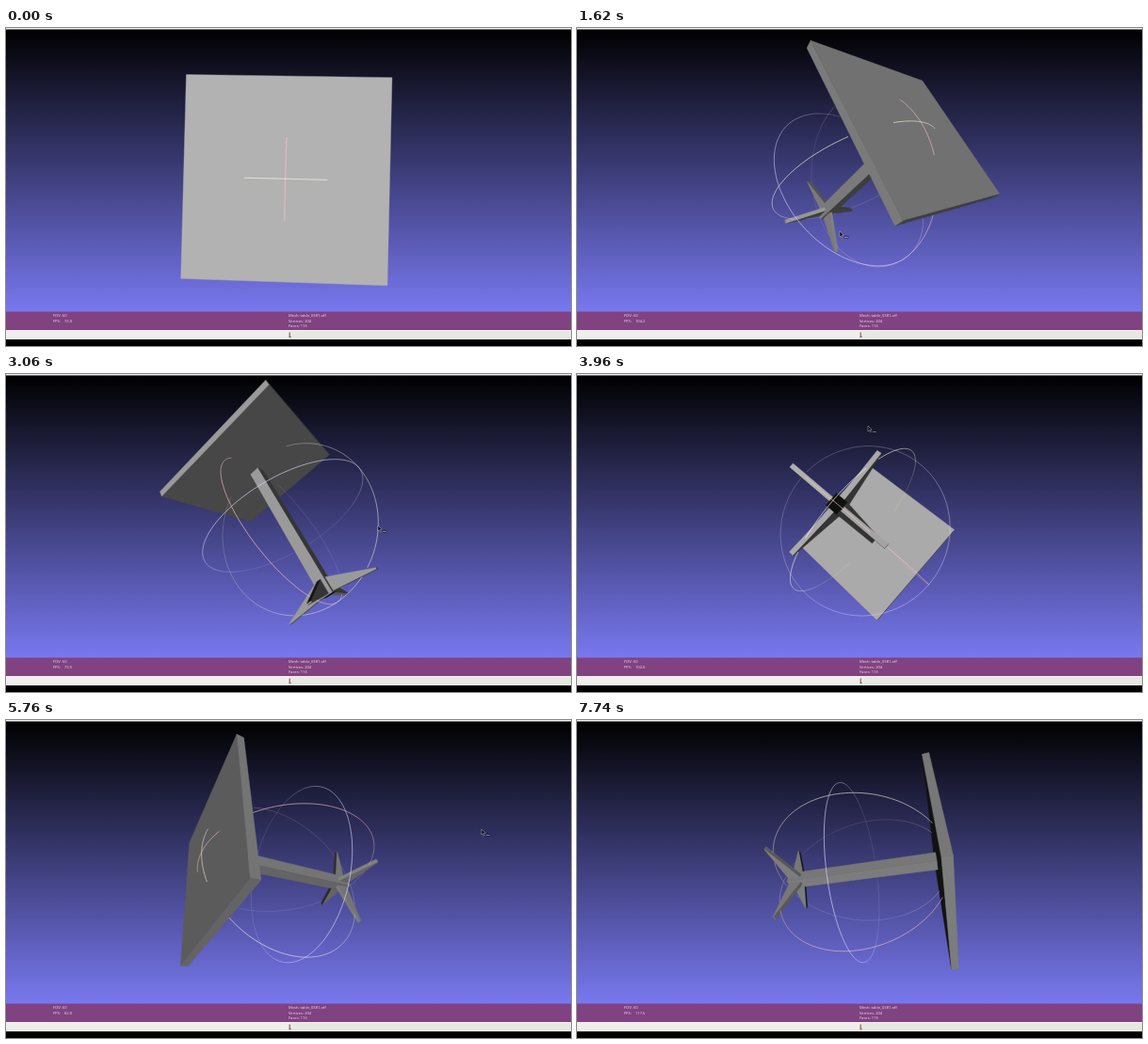
Animation, 600 px wide and 338 px high, one loop 7.86 s. Source, as an HTML page with a canvas:

```html
<!DOCTYPE html>
<html lang="en">
<head>
<meta charset="utf-8">
<title>Table mesh viewer</title>
<style>
  html, body { margin: 0; width: 600px; height: 338px; overflow: hidden; background: #000; }
  svg, canvas { position: absolute; left: 0; top: 0; display: block; }
  text { font: 4.1px "Open Sans", "Noto Sans", sans-serif; fill: #efe4ef; }
</style>
</head>
<body>
<svg width="600" height="338" viewBox="0 0 600 338">
  <defs>
    <linearGradient id="sky" x1="0" y1="0" x2="0" y2="1">
      <stop offset="0" stop-color="#000"/>
      <stop offset="1" stop-color="#8080ff"/>
    </linearGradient>
  </defs>
  <rect width="600" height="338"/>
  <rect y="1" width="600" height="320" fill="url(#sky)"/>
  <rect width="600" height="1.5" fill="#eee"/>
  <rect y="301.5" width="600" height="19.5" fill="#804280"/>
  <rect y="321" width="600" height="10" fill="#f0eeec"/>
  <rect x="302" y="322" width="298" height="8" fill="#e8e8e3"/>
  <path d="M301.2 323.5v5M300.6 328.3h2" stroke="#6b4a3a" fill="none"/>
  <text x="50" y="307.4">FOV: 60</text>
  <text x="50" y="312.8">FPS:</text>
  <text id="rate" x="62" y="312.8">73.0</text>
  <text x="300" y="307.4">Mesh: table_0381.off</text>
  <text x="300" y="312.8">Vertices: 204</text>
  <text x="300" y="318.4">Faces: 116</text>
</svg>
<canvas id="view" width="600" height="338"></canvas>
<script>
(() => {
const LOOP = 7860, STEP = 60;
const EYE = 3.03, FOCAL = 277, CX = 300, CY = 161;
const ctx = document.getElementById('view').getContext('2d');
const rateText = document.getElementById('rate');

const dot = (a, b) => a[0] * b[0] + a[1] * b[1] + a[2] * b[2];
const cross = (a, b) => [a[1] * b[2] - a[2] * b[1], a[2] * b[0] - a[0] * b[2], a[0] * b[1] - a[1] * b[0]];
const times = (a, k) => a.map(v => v * k);
const add = (...vs) => vs.reduce((s, v) => s.map((c, i) => c + v[i]));
const sub = (a, b) => a.map((v, i) => v - b[i]);
const unit = a => times(a, 1 / Math.hypot(...a));
const clamp = (v, lo, hi) => Math.min(hi, Math.max(lo, v));

// Convex solid between two matching outlines
function prism(a, b, openBase) {
  const mid = times(add(...a, ...b), .5 / a.length);
  const sides = a.map((p, i) => {
    const j = (i + 1) % a.length;
    return [p, a[j], b[j], b[i]];
  });
  return [a, b, ...sides].map((pts, i) => {
    let n = unit(cross(sub(pts[1], pts[0]), sub(pts[2], pts[0])));
    if (dot(n, sub(pts[0], mid)) < 0) n = times(n, -1);
    return { pts, n, d: dot(n, pts[0]), dark: openBase && i === 0 };
  });
}
const square = (r, h) => [[-r, -r, h], [r, -r, h], [r, r, h], [-r, r, h]];

const SLAB = .867, POST = .066;
const slab = prism(square(.8265, SLAB), square(.8265, .94));
const post = prism(square(POST, -.9), square(POST, SLAB), true);
const legs = [[1, 0], [0, 1], [-1, 0], [0, -1]].map(([c, s]) => {
  const outline = w => [[.55, -.94], [.55, -.925], [POST, -.73], [POST, -.89]]
    .map(([r, h]) => [r * c - w * s, r * s + w * c, h]);
  return { dir: [c, s, 0], solid: prism(outline(-.022), outline(.022)) };
});
const solids = [slab, post, ...legs.map(l => l.solid)];

// Key poses: angles in degrees, pointer place, frame rate
const poses = [
  { yaw: -1.4, pitch: .3, spin: -1.4, at: [222, 268], rate: '73.0' },
  { yaw: 41.4, pitch: 32, spin: 4, at: [279, 216], rate: '104.2' },
  { yaw: 90, pitch: 60.6, spin: -90, at: [388, 163], rate: '87.7' },
  { yaw: -130.6, pitch: 52.1, spin: 105, at: [395, 161], rate: '73.5' },
  { yaw: 167.6, pitch: -11.5, spin: 129.4, at: [309, 55], rate: '102.0' },
  { yaw: -58.7, pitch: 10.8, spin: 124.2, at: [505, 116], rate: '82.0' },
  { yaw: 74.8, pitch: 7.5, spin: 136, at: [505, 116], rate: '117.6' }
];
// Drags: start, end, share of the way to the next pose
const drags = [[840, 1620, 1], [1620, 2220, 1], [2220, 3060, 1], [3060, 3960, 1], [3960, 5760, 1],
  [5880, 6000, .13], [6300, 6480, .29], [6600, 7440, .58]];

const progress = t => drags.reduce((p, [a, b, share]) => p + share * clamp((t - a) / (b - a), 0, 1), 0);

// Model axes on screen: two table edges and the table normal
function axes({ yaw, pitch, spin }) {
  const [y, p, s] = [yaw, pitch, spin].map(a => a * Math.PI / 180);
  const up = [Math.sin(y) * Math.cos(p), Math.sin(p), Math.cos(y) * Math.cos(p)];
  const side = [Math.cos(y), 0, -Math.sin(y)];
  const edge = turn(side, up, s);
  return [edge, cross(up, edge), up];
}

function turn(v, axis, angle) {
  const c = Math.cos(angle), s = Math.sin(angle);
  return add(times(v, c), times(cross(axis, v), s), times(axis, dot(axis, v) * (1 - c)));
}

// Shortest turn from one pose to the next
function basisAt(i, f) {
  const a = axes(poses[i]), b = axes(poses[i + 1]);
  const axis = unit(add(...a.map((v, k) => cross(v, b[k]))));
  const trace = a.reduce((s, v, k) => s + dot(v, b[k]), 0);
  const angle = Math.acos(clamp((trace - 1) / 2, -1, 1));
  return a.map(v => turn(v, axis, angle * f));
}

function project(p, basis) {
  const [x, y, z] = add(...basis.map((e, k) => times(e, p[k])));
  const k = FOCAL / (EYE - z);
  return [CX + x * k, CY - y * k, z];
}

function trace(pts) {
  ctx.beginPath();
  pts.forEach(([x, y]) => ctx.lineTo(x, y));
}

function drawSolid(solid, basis, look, cam) {
  ctx.lineWidth = .4;
  for (const { pts, n, d, dark } of solid) {
    if (dot(n, cam) <= d) continue;
    const g = dark ? 16 : Math.round(Math.max(18, 178 * dot(n, look)));
    ctx.fillStyle = ctx.strokeStyle = `rgb(${g},${g},${g})`;
    trace(pts.map(p => project(p, basis)));
    ctx.closePath();
    ctx.fill();
    ctx.stroke();
  }
}

function hidden(p, cam) {
  const ray = sub(p, cam);
  return solids.some(solid => {
    let near = 0, far = .998;
    for (const { n, d } of solid) {
      const gap = d - dot(n, cam), speed = dot(n, ray);
      if (speed < 0) near = Math.max(near, gap / speed);
      else if (speed > 0) far = Math.min(far, gap / speed);
      else if (gap < 0) return false;
    }
    return near < far;
  });
}

// Trackball circles, one around each axis
function drawRings(basis, cam) {
  const N = 240;
  ctx.lineWidth = .8;
  ['255,196,200', '250,250,225', '222,218,255'].forEach((color, k) => {
    let prev = null;
    for (let i = 0; i <= N; i++) {
      const q = i / N * 2 * Math.PI, p = [0, 0, 0];
      p[(k + 1) % 3] = Math.cos(q);
      p[(k + 2) % 3] = Math.sin(q);
      const pt = hidden(p, cam) ? null : project(p, basis);
      if (pt && prev) {
        ctx.strokeStyle = `rgba(${color},${clamp(.42 + .45 * pt[2], .16, .85)})`;
        trace([prev, pt]);
        ctx.stroke();
      }
      prev = pt;
    }
  });
}

function drawPointer(x, y) {
  ctx.save();
  ctx.translate(x, y);
  trace([[0, 0], [0, 6], [1.4, 4.8], [2.6, 7], [3.4, 6.5], [2.4, 4.4], [4.2, 4.2]]);
  ctx.closePath();
  ctx.fillStyle = '#0a0a12';
  ctx.strokeStyle = 'rgba(225,225,235,.75)';
  ctx.lineWidth = .5;
  ctx.fill();
  ctx.stroke();
  ctx.beginPath();
  ctx.ellipse(6.8, 6.3, 2.6, 1.2, .1, 0, 2 * Math.PI);
  ctx.strokeStyle = 'rgba(20,20,30,.9)';
  ctx.lineWidth = .7;
  ctx.stroke();
  ctx.fillStyle = 'rgba(215,215,225,.6)';
  ctx.fillRect(4.8, 6, 4, .8);
  ctx.restore();
}

function draw(t) {
  const p = progress(t);
  const i = Math.min(Math.floor(p), poses.length - 2), f = p - i;
  const basis = basisAt(i, f);
  const look = basis.map(e => e[2]), cam = times(look, EYE);
  const paint = s => drawSolid(s, basis, look, cam);
  const base = () => {
    const order = [...legs].sort((a, b) => dot(a.dir, cam) - dot(b.dir, cam));
    const behind = l => dot(l.dir, cam) < POST;
    order.filter(behind).forEach(l => paint(l.solid));
    paint(post);
    order.filter(l => !behind(l)).forEach(l => paint(l.solid));
  };

  ctx.clearRect(0, 0, 600, 338);
  if (cam[2] > SLAB) { base(); paint(slab); }
  else { paint(slab); base(); }
  drawRings(basis, cam);
  if (t >= 840 && t < 5940) {
    const a = poses[i].at, b = poses[i + 1].at;
    drawPointer(...add(a, times(sub(b, a), f)));
  }
  rateText.textContent = poses[Math.round(p)].rate;
}

const start = performance.now();
let last = -1;
function tick() {
  const t = Math.floor((performance.now() - start) % LOOP / STEP) * STEP;
  if (t !== last) draw(last = t);
  requestAnimationFrame(tick);
}
tick();
})();
</script>
</body>
</html>
```
